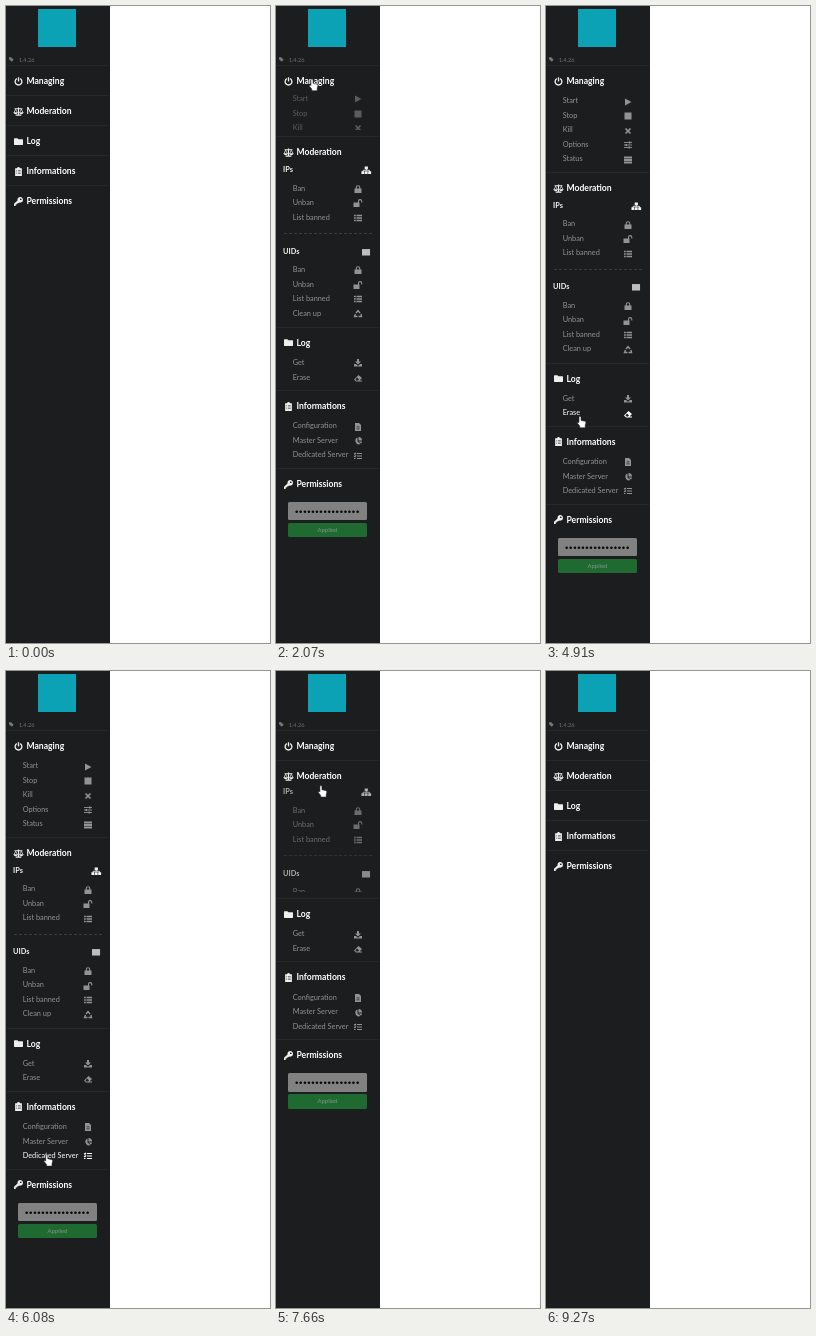
Animation of 264x637 px, one loop 9310 ms. Source, as an HTML page:

```html
<!DOCTYPE html>
<html lang="en">
<head>
<meta charset="utf-8">
<title>Accordion menu</title>
<style>
html, body { margin: 0; width: 100%; height: 100%; overflow: hidden; background: #fff; }
#stage { position: relative; width: 264px; height: 637px; overflow: hidden; font-family: Lato, "Open Sans", sans-serif; }
#side { position: absolute; left: 0; top: 0; width: 104px; height: 637px; background: #1b1d1e; }
svg { position: absolute; overflow: visible; fill: currentColor; }
.mark { position: absolute; left: 32px; top: 3px; width: 38px; height: 38px; background: #0aa2b4; }
.version { position: absolute; left: 12.7px; top: 49px; font-size: 5.7px; line-height: 10px; color: #707172; }
.tag { left: 3px; top: 51px; color: #777; }
#menu { position: absolute; left: 0; top: 60px; width: 104px; }
.section { position: relative; padding-bottom: 6.75px; }
.section::before { content: ""; position: absolute; left: 0; top: -1px; width: 103px; height: 1px; background: #252728; }
.title { position: relative; height: 23.25px; color: #fff; font-weight: 700; font-size: 8.6px; line-height: 30px; }
.title span { position: absolute; left: 20.5px; }
.title svg { left: 7.5px; top: 10.5px; color: #eee; }
.panel { position: relative; overflow: hidden; height: 0; }
.content { position: absolute; left: 0; top: 0; width: 104px; }
.row { position: absolute; left: 0; width: 104px; height: 14.5px; line-height: 14.5px; font-size: 7.35px; color: #929394; }
.row span { position: absolute; left: 16.7px; white-space: nowrap; }
.row svg { left: 78.2px; top: 3.25px; }
.row.on { color: #fff; }
.row.head { color: #f4f4f4; font-weight: 700; }
.row.head span { left: 7px; }
.row.head svg { left: 85.8px; top: 3px; }
.rule { position: absolute; left: 8px; width: 88px; border-top: 1px dashed #393b3c; }
.field, .button { position: absolute; left: 12px; width: 79px; text-align: center; border-radius: 1.5px; }
.field { top: 4.5px; height: 18.5px; background: #818181; color: #080808; font: 9.6px/20px "Liberation Sans", Arial, sans-serif; letter-spacing: .7px; }
.button { top: 25.3px; height: 14.5px; line-height: 14.5px; font-size: 5.9px; background: #1f6a30; color: #86958a; }
#cursor { left: 0; top: 0; fill: #fff; stroke: #222; stroke-width: .5; stroke-linejoin: round; }
</style>
</head>
<body>
<div id="stage">
  <div id="side">
    <div class="mark"></div>
    <div class="version">1.4.26</div>
    <div id="menu"></div>
  </div>
  <svg id="cursor" width="10" height="13" viewBox="0 0 10 13">
    <path id="arrow" d="M0 0V9.4L2.2 7.5 3.7 10.6 5.1 9.9 3.6 6.9H6.4Z"/>
    <path id="hand" d="M-1 .8Q0-.5 1 .8V4.3L5.2 5.2Q6 5.5 5.9 6.6L5.2 9.2V11.6H-.2V10L-2.7 6.9Q-2.7 5.6-1.3 6.3L-1 6.6Z"/>
  </svg>
</div>
<script>
const LOOP = 9310, SLIDE = 400, PAD = 5.2, ROW = 14.5;

// Icons on a 16 unit grid
const p = (d, more = '') => `<path fill-rule="evenodd" d="${d}" ${more}/>`;
const line = (d, w = 2) => p(d, `fill="none" stroke="currentColor" stroke-width="${w}"`);
const ICONS = {
  power: line('M5 3A6 6 0 1 0 11 3M8 .5V8', 2.4),
  scale: line('M8 1V14M3 14.5H13M1 3H15', 2) + line('M0 10L3 4 6 10M10 10L13 4 16 10', 1.3) +
    p('M-1 9.5H7Q6 13 3 13T-1 9.5ZM9 9.5H17Q16 13 13 13T9 9.5Z'),
  folder: p('M0 3Q0 2 1 2H6L8 4H15Q16 4 16 5V13Q16 14 15 14H1Q0 14 0 13Z'),
  clipboard: p('M2 2H5Q8-2 11 2H14V16H2ZM4 6V7.5H5.5V6ZM7 6V7.5H12V6ZM4 10V11.5H5.5V10ZM7 10V11.5H12V10Z'),
  key: p('M11 0A5 5 0 1 1 9 9.6L7 11.5H5V13.5H3V16H0V12L6.3 6A5 5 0 0 1 11 0ZM12 2.5A1.5 1.5 0 1 0 12 5.5 1.5 1.5 0 0 0 12 2.5Z'),
  tag: p('M0 1H7L15 9 9 15 0 7Z'),
  play: p('M2 1L15 8 2 15Z'),
  stop: p('M1 1H15V15H1Z'),
  cross: line('M3 3L13 13M13 3L3 13', 3.4),
  sliders: line('M0 3H16M0 8H16M0 13H16', 1.8) + p('M10 1H13V5H10ZM3 6H6V10H3ZM9 11H12V15H9Z'),
  server: p('M0 1H16V5H0ZM0 6H16V10H0ZM0 11H16V15H0Z'),
  lock: p('M1 7H15V16H1Z') + line('M4.5 8V5A3.5 3.5 0 0 1 11.5 5V8', 2.2),
  unlock: p('M-1 7H11V16H-1Z') + line('M9 8V4.5A3 3 0 0 1 15.5 4.5V7', 2.2),
  list: line('M0 3H3.5M5 3H16M0 8H3.5M5 8H16M0 13H3.5M5 13H16', 2.9),
  recycle: line('M4 6L8 1 12 6M14 8L15 13H9M7 13H1L3 8', 2.8),
  download: p('M6 0H10V5H14L8 11 2 5H6ZM0 10H4L8 14 12 10H16V15H0Z'),
  eraser: p('M9 2L16 8 11 13H16V15H4L0 11ZM6 7L3 11 5 13H8L10 11Z'),
  file: p('M2 0H10L14 4V16H2ZM5 7V8.3H11V7ZM5 11V12.3H11V11Z'),
  pie: p('M7 1V9L13 14A7 7 0 1 1 7 1ZM9 0A7 7 0 0 1 16 7H9ZM9 9H16Q16 11 14 13Z'),
  tasks: line('M0 3L2 4.5 4 1.5M0 8L2 9.5 4 6.5M0 13H3M6 3H16M6 8H16M6 13H16', 2.3),
  tree: line('M8 4V8M2 12V8H14V12', 1.6) + p('M5 1H11V6H5ZM-1 10H4.5V15H-1ZM5.5 10H10.5V15H5.5ZM11.5 10H17V15H11.5Z'),
  block: p('M0 2H15V14H0Z', 'opacity=".75"')
};
const icon = (name, size, cls = '') =>
  `<svg class="${cls}" width="${size}" height="${size}" viewBox="0 0 16 16">${ICONS[name]}</svg>`;

const bans = [['Ban', 'lock'], ['Unban', 'unlock'], ['List banned', 'list']];
const stack = (items, first = 7.25) => items.map(([text, name], i) => ({ text, name, y: first + i * ROW }));

// open and shut are the click times
const sections = [
  { title: 'Managing', icon: 'power', open: 1862, shut: 7029, full: 77,
    rows: stack([['Start', 'play'], ['Stop', 'stop'], ['Kill', 'cross'], ['Options', 'sliders'], ['Status', 'server']]) },
  { title: 'Moderation', icon: 'scale', open: 1570, shut: 7506, full: 160.5, rule: 67.3,
    rows: [{ text: 'IPs', name: 'tree', y: 4.75, head: true }, ...stack(bans, 23.25),
           { text: 'UIDs', name: 'block', y: 86.25, head: true }, ...stack([...bans, ['Clean up', 'recycle']], 104.75)] },
  { title: 'Log', icon: 'folder', open: 1290, shut: 8000, full: 33.3,
    rows: stack([['Get', 'download'], ['Erase', 'eraser']]) },
  { title: 'Informations', icon: 'clipboard', open: 985, shut: 8390, full: 48,
    rows: stack([['Configuration', 'file'], ['Master Server', 'pie'], ['Dedicated Server', 'tasks']]) },
  { title: 'Permissions', icon: 'key', open: 690, shut: 8720, full: 47, rows: [], form: true }
];

// Pointer path: time, x, y
const path = [
  [40, 238, 630], [620, 46, 197], [700, 46, 195], [940, 42, 169], [985, 42, 167], [1285, 38, 137],
  [1450, 34, 117], [1570, 34, 106], [1860, 36, 75], [2070, 36, 73], [2860, 34, 122], [3800, 36, 282],
  [4770, 34, 395], [4910, 34, 410], [5700, 36, 499], [5980, 40, 534], [6640, 45, 204], [6940, 50, 70],
  [7025, 50, 74], [7190, 49.5, 83], [7506, 46, 107], [7640, 45, 113], [8000, 44, 138], [8260, 43, 150],
  [8390, 43, 167], [8600, 44, 176], [8720, 45, 195], [8780, 50, 198], [9270, 236, 342]
];

const $ = id => document.getElementById(id);
const add = (parent, cls, html = '') => {
  const el = document.createElement('div');
  el.className = cls;
  el.innerHTML = html;
  return parent.appendChild(el);
};

$('side').insertAdjacentHTML('beforeend', icon('tag', 5, 'tag'));
for (const s of sections) {
  const box = add($('menu'), 'section');
  add(box, 'title', icon(s.icon, 9) + `<span>${s.title}</span>`);
  s.panel = add(box, 'panel');
  s.content = add(s.panel, 'content');
  for (const r of s.rows) {
    r.el = add(s.content, r.head ? 'row head' : 'row', `<span>${r.text}</span>` + icon(r.name, r.head ? 8.6 : 8));
    r.el.style.top = r.y - ROW / 2 + 'px';
  }
  if (s.rule) add(s.content, 'rule').style.top = s.rule + 'px';
  if (s.form) {
    add(s.content, 'field', '•'.repeat(16));
    add(s.content, 'button', 'Applied');
  }
}

const swing = (t, start) => 0.5 - Math.cos(Math.PI * Math.min(1, Math.max(0, (t - start) / SLIDE))) / 2;

function pointer(t) {
  const i = path.findIndex(k => k[0] > t);
  if (i < 1) return null;
  const [t0, x0, y0] = path[i - 1], [t1, x1, y1] = path[i];
  const k = (t - t0) / (t1 - t0);
  return { x: x0 + (x1 - x0) * k, y: y0 + (y1 - y0) * k };
}

function draw(t) {
  const at = pointer(t);
  const inside = at && at.x < 104;
  let top = 60, hand = false;
  for (const s of sections) {
    const k = swing(t, s.open) - swing(t, s.shut);
    const start = top + 23.25;
    s.panel.style.height = s.full * k + 'px';
    s.content.style.top = PAD * k + 'px';
    s.panel.style.opacity = k;
    if (inside && Math.abs(at.y - top - 15) < 10) hand = true;
    for (const r of s.rows) {
      if (r.head) continue;
      const on = inside && k === 1 && Math.abs(at.y - start - PAD - r.y) < ROW / 2;
      r.el.classList.toggle('on', on);
      hand = hand || on;
    }
    top += 30 + s.full * k;
  }
  $('cursor').style.display = at ? '' : 'none';
  if (at) $('cursor').style.transform = `translate(${at.x}px, ${at.y}px)`;
  $('hand').style.display = hand ? '' : 'none';
  $('arrow').style.display = hand ? 'none' : '';
}

const begin = performance.now();
function tick() {
  draw((performance.now() - begin) % LOOP);
  requestAnimationFrame(tick);
}
tick();
</script>
</body>
</html>
```
